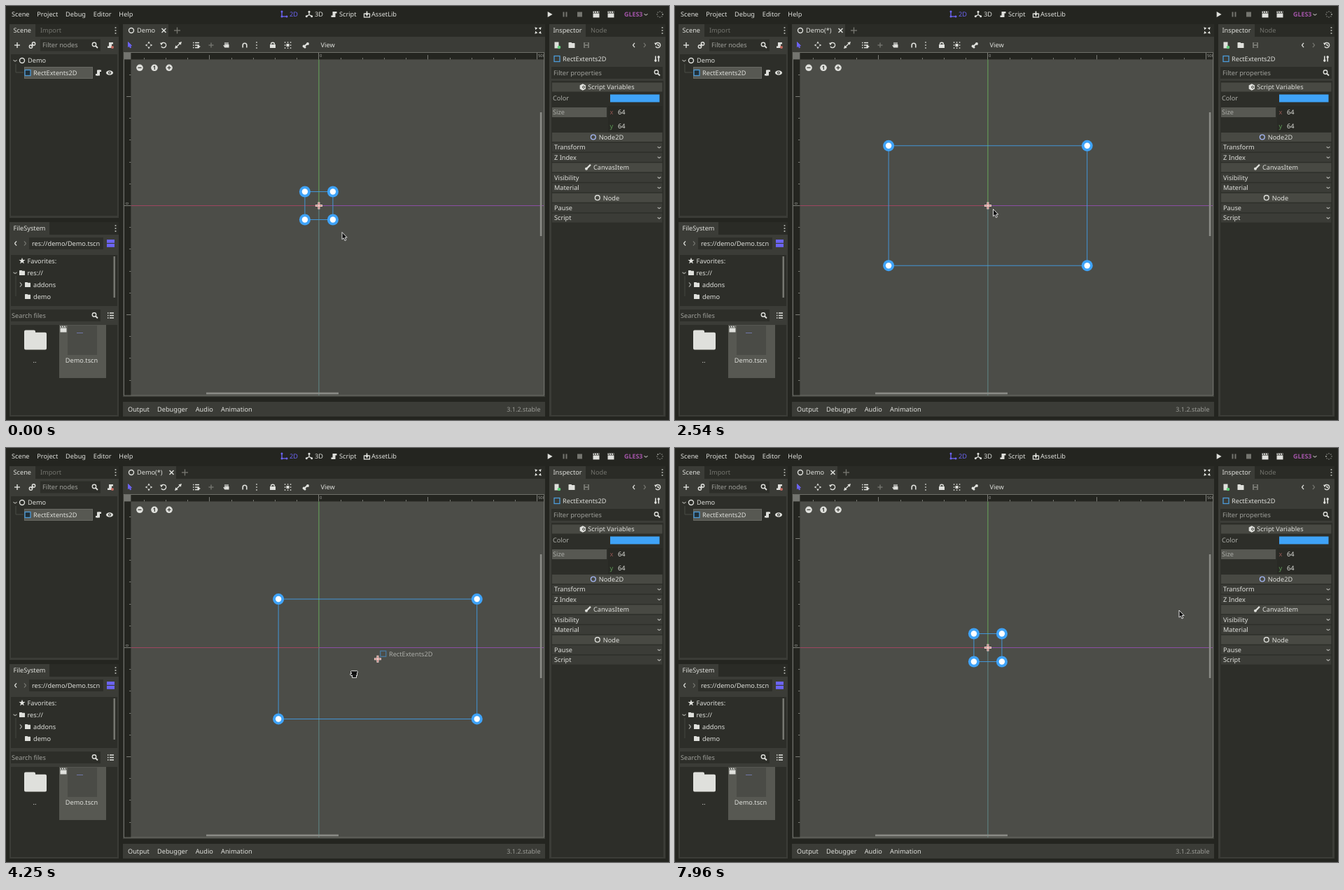
An HTML page with a canvas for the animation above (8000 ms loop, 947 by 592 pixels).

```html
<!DOCTYPE html>
<html lang="en">
<head>
<meta charset="utf-8">
<title>Rect extents editor</title>
<style>
html, body { margin: 0; width: 100%; height: 100%; overflow: hidden; background: #242520; }
canvas { display: block; }
</style>
</head>
<body>
<canvas id="stage" width="947" height="592"></canvas>
<script>
const view = document.getElementById('stage').getContext('2d');
const backdrop = document.createElement('canvas');
backdrop.width = 947;
backdrop.height = 592;
let g = backdrop.getContext('2d');

const LOOP = 8000, SCALE = 0.624, CX = 446.9, CY = 285.5, TAU = Math.PI * 2;
const OUTER = '#242520', PANEL = '#3b3c37', DARK = '#2d2e29', CANVAS = '#4c4d48', HEAD = '#484943',
  SELECT = '#575852', FG = '#dfe0dc', SOFT = '#a0a19c', OFF = '#74756f', ACCENT = '#6c64f5', BLUE = '#3fa3f8';

// ---------- drawing helpers ----------
function box(x, y, w, h, color) { g.fillStyle = color; g.fillRect(x, y, w, h); }
function frame(x, y, w, h, color, width = 1) {
  g.strokeStyle = color; g.lineWidth = width; g.strokeRect(x, y, w, h);
}
function dot(x, y, r, color = FG) {
  g.fillStyle = color; g.beginPath(); g.arc(x, y, r, 0, TAU); g.fill();
}
function ring(x, y, r, color = FG, width = 1.4, from = 0, to = TAU) {
  g.strokeStyle = color; g.lineWidth = width; g.beginPath(); g.arc(x, y, r, from, to); g.stroke();
}
function line(x1, y1, x2, y2, color = FG, width = 1.3) {
  g.strokeStyle = color; g.lineWidth = width;
  g.beginPath(); g.moveTo(x1, y1); g.lineTo(x2, y2); g.stroke();
}
function poly(x, y, points, color = FG) {
  g.beginPath();
  points.forEach(([dx, dy]) => g.lineTo(x + dx, y + dy));
  g.closePath(); g.fillStyle = color; g.fill();
}
// A regular polygon, or a star when the inner radius differs.
function star(x, y, n, r, inner, color = FG, turn = 0) {
  poly(x, y, Array.from({ length: 2 * n }, (_, i) => {
    const a = i * Math.PI / n + turn, d = i % 2 ? inner : r;
    return [Math.sin(a) * d, -Math.cos(a) * d];
  }), color);
}
const triangle = (x, y, r, turn, color) => star(x, y, 3, r, r / 2, color, turn);
function text(s, x, y, color = FG, size = 9.2, align = 'left', weight = 400) {
  g.font = `${weight} ${size}px "Noto Sans", sans-serif`;
  g.textRendering = 'geometricPrecision';
  g.textAlign = align;
  g.fillStyle = color;
  g.fillText(s, x, y + size * 0.36);
  return g.measureText(s).width;
}
function flow(labels, x, y, gap) { for (const s of labels) x += text(s, x, y) + gap; }

// ---------- icons, placed by their centre ----------
function plus(x, y, color = FG, r = 4, width = 1.4) {
  line(x - r, y, x + r, y, color, width); line(x, y - r, x, y + r, color, width);
}
function times(x, y) { line(x - 3, y - 3, x + 3, y + 3, FG, 1.5); line(x - 3, y + 3, x + 3, y - 3, FG, 1.5); }
// dir: 0 right, 1 down, 2 left
function chevron(x, y, dir, color = FG, r = 3.2) {
  g.save(); g.translate(x, y); g.rotate(dir * Math.PI / 2);
  line(-r / 3, -r, r / 2, 0, color, 1.2); line(r / 2, 0, -r / 3, r, color, 1.2);
  g.restore();
}
function menuDots(x, y) { for (let d = -4; d <= 4; d += 4) dot(x, y + d, 1.1, '#b0b1ac'); }
function rectIcon(x, y, color = '#4c9ad8') { frame(x - 4, y - 4, 8, 8, color, 1.3); }
function magnifier(x, y) { ring(x - 1, y - 1, 2.7); line(x + 1, y + 1, x + 4, y + 4, FG, 1.8); }
function folder(x, y, w = 8) {
  const h = w * 0.44, r = w / 16;
  g.fillStyle = FG; g.beginPath();
  g.roundRect(x - w / 2, y - h, w / 2, h, r);
  g.roundRect(x - w / 2, y - h * 0.76, w, h * 1.76, r);
  g.fill();
}
function script(x, y) {
  box(x - 2, y - 4, 4, 8, FG); box(x - 4, y + 1.5, 4, 2.5, FG); box(x, y - 4, 4, 2.5, FG);
}
function clapper(x, y) {
  box(x - 4.5, y - 1.5, 9, 6, FG); box(x - 4.5, y - 4.5, 9, 2.4, FG);
  for (let d = -2.5; d < 4; d += 3) line(x + d - .5, y - 4.7, x + d + .5, y - 2, OUTER, 1);
}
function tripod(x, y, color, arms) {
  for (let i = 0; i < arms; i++) {
    const a = Math.PI / 2 * 3 + i * TAU / arms, dx = Math.cos(a) * 4.3, dy = Math.sin(a) * 4.3;
    line(x, y, x + dx, y + dy, color); dot(x + dx, y + dy, 1.5, color);
  }
}
function axes2D(x, y) {
  line(x - 3, y - 4, x - 3, y + 3, ACCENT); line(x - 3, y + 3, x + 5, y + 3, ACCENT);
  dot(x - 3, y - 4, 1.5, ACCENT); dot(x - 3, y + 3, 1.5, ACCENT); dot(x + 4, y + 3, 1.5, ACCENT);
}
function download(x, y) {
  frame(x - 4, y - 1, 8, 5, FG, 1.3); line(x, y - 4.5, x, y, FG, 1.6); triangle(x, y, 2.8, Math.PI, FG);
}
function moveIcon(x, y) {
  for (let i = 0; i < 4; i++) {
    const a = i * TAU / 4;
    triangle(x + Math.sin(a) * 3.4, y - Math.cos(a) * 3.4, 2, a, FG);
  }
}
function turnIcon(x, y) { ring(x, y, 3.6, FG, 1.4, -2.6, 2.6); triangle(x - 3, y - 2, 2.4, Math.PI, FG); }
function handIcon(x, y) {
  box(x - 2.5, y - 1, 6, 4.5, FG);
  for (let d = -2; d <= 2; d += 2) line(x + d, y, x + d, y - 4, FG, 1.2);
  line(x - 4, y, x - 2, y + 3, FG, 1.5);
}
function lock(x, y) { box(x - 4, y - 1, 8, 5, FG); ring(x, y - 1.2, 2.5, FG, 1.4, Math.PI, TAU); }
function magnet(x, y) {
  ring(x, y, 2.8, FG, 1.6, Math.PI, TAU);
  for (const s of [-1, 1]) line(x + s * 2.8, y, x + s * 2.8, y + 3.5, FG, 1.6);
}
function group(x, y) {
  for (let i = 0; i < 9; i++) if (i !== 4) box(x - 4.7 + i % 3 * 4, y - 4.7 + Math.floor(i / 3) * 4, 1.5, 1.5, FG);
  box(x - 2, y - 2, 4, 4, FG);
}
function list(x, y) { for (let d = -3.5; d <= 3.5; d += 3.5) { box(x - 4, y + d - .7, 1.5, 1.5, FG); box(x - 1, y + d - .7, 6, 1.5, FG); } }
function field(x, y, w, label) { box(x, y, w, 17, DARK); text(label, x + 3, y + 8.5, SOFT); magnifier(x + w - 8, y + 8.5); }

// ---------- fixed interface ----------
function dock(x, y, w, h, tabWidth, title, hidden) {
  box(x, y, w, 18, '#2a2b26');
  box(x, y, tabWidth, 18, PANEL);
  box(x, y + 18, w, h - 18, PANEL);
  text(title, x + 5.5, y + 9);
  if (hidden) text(hidden, x + tabWidth + 7, y + 9, OFF);
  menuDots(x + w - 4.5, y + 9);
}
function drawMenu() {
  flow(['Scene', 'Project', 'Debug', 'Editor', 'Help'], 8, 12, 10.8);
  axes2D(397, 12); text('2D', 405, 12, ACCENT);
  tripod(433, 12.5, FG, 3); text('3D', 441, 12);
  script(468.5, 12); text('Script', 476, 12);
  download(515.5, 12); text('AssetLib', 522, 12);
  triangle(776, 12, 4.6, TAU / 4, FG);
  box(795.5, 8.5, 2, 7, OFF); box(799.5, 8.5, 2, 7, OFF); box(816, 8.5, 7, 7, OFF);
  clapper(843, 12); clapper(864, 12);
  text('GLES3', 883, 12, '#a455a9', 8.9, 'left', 700);
  chevron(914, 12, 1, SOFT, 2.5);
}
function drawSceneDock() {
  dock(5, 26, 156, 277, 37, 'Scene', 'Import');
  plus(16, 56);
  ring(39.5, 54, 2.2); ring(35.5, 58, 2.2); line(36, 57.5, 39, 54.5);
  field(49, 47.5, 86, 'Filter nodes');
  script(149, 56); dot(152, 59, 2, '#c46a60');
  box(7, 69, 152, 231, DARK);
  chevron(13, 78, 1, SOFT, 2.5); ring(23, 78, 3.5); text('Demo', 31, 78);
  line(14, 83, 14, 95, '#4b4c47', 1); line(14, 95, 25, 95, '#4b4c47', 1);
  box(26, 87, 98, 17, SELECT); frame(26.5, 87.5, 97, 16, '#686963');
  box(27, 91.5, 8, 8, '#20303a'); rectIcon(31, 95.5); text('RectExtents2D', 39, 95.5);
  script(132, 95.5);
  g.fillStyle = FG; g.beginPath(); g.ellipse(148, 95.5, 5, 3.3, 0, 0, TAU); g.fill();
  dot(148, 95.5, 2, DARK); dot(148, 95.5, .9);
}
function drawFileDock() {
  dock(5, 309, 156, 278, 57, 'FileSystem');
  chevron(14, 339.5, 2); chevron(27, 339.5, 0, OFF);
  box(33, 331, 106, 17, DARK); text('res://demo/Demo.tscn', 37, 339.5);
  box(144, 334, 11, 4.8, ACCENT); box(144, 340, 11, 4.8, ACCENT);
  box(7, 356, 152, 73, DARK); box(153.5, 358, 2.5, 59, '#767771');
  const rowY = i => 364.5 + 17 * i;
  star(23, rowY(0), 5, 4.8, 2); text('Favorites:', 30.5, rowY(0));
  chevron(13, rowY(1), 1, SOFT, 2.5); folder(23, rowY(1)); text('res://', 30.5, rowY(1));
  line(14, 386, 14, 415, '#454640', 1);
  chevron(21, rowY(2), 0, SOFT);
  ['addons', 'demo'].forEach((s, i) => { folder(31, rowY(i + 2)); text(s, 39, rowY(i + 2)); });
  field(7, 434, 128, ''); text('Search files', 8, 442.5, SOFT); list(149, 442.5);
  box(7, 456, 152, 129, DARK);
  folder(42, 477.5, 32); text('..', 41, 507, FG, 9.2, 'center');
  box(76, 456, 67, 76, SELECT); box(88, 457, 42, 42, '#4a4b46');
  box(101, 467, 9, 1, '#6f76a8'); clapper(82, 462);
  text('Demo.tscn', 108, 507, FG, 9.2, 'center');
}
function drawCenter() {
  box(167, 26, 603, 18, '#2a2b26');
  box(167, 44, 603, 515, PANEL);
  box(167, 566, 603, 21, PANEL);
  for (let i = 0; i < 4; i++) triangle(760 + (i % 2 ? 3 : -3), 35 + (i < 2 ? -3 : 3), 2.4, [-1, 1, -3, 3][i] * TAU / 8, FG);
  drawArrow(174.5, 51.5, ACCENT, ACCENT, .7);
  moveIcon(204, 56); turnIcon(225, 56);
  line(243, 59, 249, 53); triangle(249, 53, 2.8, TAU / 8, FG); triangle(243, 59, 2.8, TAU * 5 / 8, FG);
  list(271, 56); triangle(275, 58, 3, TAU / 4, FG);
  plus(293, 56, OFF, 3.5); handIcon(315, 56);
  magnet(341, 56); menuDots(358, 56); lock(381, 56); group(402.5, 56);
  line(426, 58, 431, 53, FG, 2.2); dot(425.5, 57.5, 1.9); dot(431, 54, 1.9); dot(427, 59, 1.5);
  text('View', 449.5, 56);
  flow(['Output', 'Debugger', 'Audio', 'Animation'], 174, 576.5, 11.2);
  text('3.1.2.stable', 763.5, 576.5, '#9a9b96', 9, 'right');

  box(169, 67, 599, 490, CANVAS);
  box(178, 285, 269, 1, '#9d4560'); box(447, 285, 321, 1, '#8b4fa3');
  box(446.4, 76, 1, 209, '#69a85d'); box(446.4, 286, 1, 271, '#618a88');
}
function drawInspector() {
  dock(776, 26, 166, 561, 52, 'Inspector', 'Node');
  box(783.5, 51.5, 6, 9, FG); dot(790, 59, 2.3, '#5fd07a');
  folder(808, 56, 9);
  box(825, 52, 8, 8, OFF); box(827, 52.5, 4, 2.5, PANEL); box(827, 57, 4, 2.5, PANEL);
  chevron(897, 56, 2); chevron(912, 56, 0, OFF);
  turnIcon(931, 56); line(931, 54, 931, 56.5); line(931, 56.5, 933, 56.5);
  rectIcon(787, 75.5); text('RectExtents2D', 795, 75.5);
  for (const s of [-1, 1]) { line(930 + s * 2.2, 71.5, 930 + s * 2.2, 79.5, FG, 1.6); dot(930 + s * 2.2, 75.5 - s * 2.5, 1.7); }
  field(779, 87, 159, 'Filter properties');
  box(779, 107, 160, 478, DARK);

  const header = (s, y) => {
    box(780, y - 6.5, 157.5, 13, HEAD);
    const width = text(s, 864.5, y, FG, 9.2, 'center');
    return 864.5 + (s === 'Script Variables' ? 0.5 : 0) - width / 2 - 8;
  };
  star(header('Script Variables', 116), 116, 3, 4.8, 4.8); ring(825, 116, 1.5, HEAD, 1);
  text('Color', 781, 132, '#aaaba6'); box(863, 126.5, 70.5, 11, BLUE);
  box(780, 145, 78, 14, SELECT); text('Size', 781, 152, '#aaaba6');
  box(860, 143, 77.5, 37, '#292a25');
  text('x', 862.5, 152, '#8d5550'); text('64', 874, 152);
  text('y', 862.5, 171.5, '#5c9a55'); text('64', 874, 171.5);

  const rows = ['# Node2D', 'Transform', 'Z Index', '# CanvasItem', 'Visibility', 'Material', '# Node', 'Pause', 'Script'];
  rows.forEach((row, i) => {
    const y = 187.5 + 14.45 * i;
    if (row[0] !== '#') {
      box(780, y - 6.5, 157.5, 13, PANEL); text(row, 783, y); chevron(933, y, 1, '#b0b1ac', 2.3);
      return;
    }
    const x = header(row.slice(2), y);
    if (row === '# CanvasItem') { line(x - 2, y + 2, x + 4, y - 4, FG, 2.2); dot(x - 2, y + 2, 2); }
    else ring(x, y, 3.4, row === '# Node2D' ? '#a5b7f3' : FG);
  });
}

// ---------- motion ----------
const SPANS = {
  approach: [210, 420], widen: [630, 1380], heighten: [1460, 1920], release: [2130, 2540],
  lift: [2710, 3500], orbit: [3580, 4400], settle: [4420, 4560], leave: [4660, 5170], exit: [7830, 7960],
};
const UNDO_MOVE = 5710, UNDO_SIZE = 6380, DROP = 4660;

function progress(name, t) {
  const [from, to] = SPANS[name];
  return Math.min(1, Math.max(0, (t - from) / (to - from)));
}
const smooth = u => u * u * (3 - 2 * u);
const mix = (a, b, u) => a + (b - a) * u;
const glide = (a, b, u) => [mix(a[0], b[0], u), mix(a[1], b[1], u)];

// Half width and half height of the handles.
function halfSize(t) {
  if (t >= SPANS.exit[0]) return [20, 20];
  const u = progress('widen', t), v = smooth(progress('heighten', t));
  const w = mix(20, 150.7, Math.sin(u * Math.PI / 2)), h = mix(20, 18, u) + 32 * Math.sin(u * Math.PI);
  return glide([w, h], [141.8, 85.7], v);
}
// The node is lifted away, swung clockwise round an ellipse, then set down.
function nodeCentre(t) {
  if (t >= UNDO_MOVE) return [CX, CY];
  const lift = progress('lift', t);
  let shift = [90 * smooth(lift), 3.5 * lift - 50 * Math.sin(lift * Math.PI)];
  if (t >= SPANS.orbit[0]) {
    const a = 0.27 + 8.06 * progress('orbit', t);
    shift = [42 + 50 * Math.cos(a), -8.3 + 45.3 * Math.sin(a)];
  }
  shift = glide(shift, [21.1, 7.2], smooth(progress('settle', t)));
  return [CX + shift[0], CY + shift[1]];
}
function arrowTip(t) {
  if (t < SPANS.widen[0]) return glide([480, 323.5], [474, 317], progress('approach', t));
  if (t < SPANS.release[1]) {
    const [w, h] = halfSize(t);
    return glide([CX + w, CY + h - 1.5], [454.5, 290.5], progress('release', t));
  }
  if (t < DROP) return [454.5, 290.5];
  const rest = glide([470, 294], [514.8, 404], smooth(progress('leave', t)));
  return glide(rest, [720, 232], progress('exit', t));
}

// ---------- moving parts ----------
function drawTab(dirty) {
  const w = dirty ? 76 : 65;
  box(167, 26, w, 18, PANEL);
  ring(179, 35, 3.5);
  text(dirty ? 'Demo(*)' : 'Demo', 187, 35);
  times(160.5 + w, 35);
  plus(179.5 + w, 35, OFF, 4.5);
}
function drawRulers(fine) {
  const unit = fine ? 8 : 50, step = unit * SCALE, width = 9.4, mark = '#7c7d77';
  g.save();
  g.beginPath(); g.rect(169, 67, 599, 490); g.clip();
  box(169, 67, 599, width, OUTER); box(169, 67, width, 490, OUTER);
  for (let k = -60; k <= 70; k++) {
    const x = Math.round(CX - .5 + k * step), y = Math.round(CY - .5 + k * step);
    const length = width * (k % 10 === 0 ? 1 : k % 5 === 0 ? 0.67 : 0.25);
    if (x > 178) box(x, 67 + width - length, 1, length, mark);
    if (y > 76) box(169 + width - length, y, length, 1, mark);
    if (k % 10) continue;
    if (x > 178) text(k * unit, x + 2, 71, SOFT, 5.8);
    if (y > 76) {
      g.save(); g.translate(172.5, y - 1); g.rotate(-Math.PI / 2);
      text(k * unit, 0, 0, SOFT, 5.8); g.restore();
    }
  }
  box(169, 67, width, width, '#747570');
  g.restore();
  frame(168.5, 66.5, 600, 490.5, mark, .8);
}
function drawOverlay() {
  for (let i = 0; i < 3; i++) dot(191 + 21 * i, 88.3, 4.8);
  line(188.5, 88.3, 193.5, 88.3, CANVAS, 1.4);
  text('1', 211.8, 88.3, '#30312c', 7.5, 'center', 700);
  plus(233, 88.3, CANVAS, 2.5);
  box(762.8, 152, 2.6, 177, '#8a8b86'); box(286, 552.6, 189, 2.6, '#8a8b86');
}
function drawArrow(x, y, fill = '#0c0c0c', edge = '#f2f2f2', k = 1) {
  const outline = [[0, 0], [0, 10.2], [2.3, 8.2], [4, 12], [5.8, 11.2], [4.2, 7.5], [7.2, 7.5]];
  poly(x, y, outline.map(([dx, dy]) => [dx * k, dy * k]), fill);
  g.lineWidth = .9; g.strokeStyle = edge; g.stroke();
}
function drawGrab(x, y) {
  for (const [grow, color] of [[.9, '#f2f2f2'], [0, '#0c0c0c']]) {
    for (let i = 0; i < 4; i++) dot(x - 2.8 + i * 2.1, y - 2.6, 1.2 + grow, color);
    dot(x - 3.8, y + .8, 1 + grow, color);
    box(x - 3 - grow, y - 2, 7 + grow * 2, 4 + grow, color);
    box(x - 2 - grow, y + 2, 5 + grow * 2, 3 + grow, color);
  }
}
function drawSpinner(t) {
  const done = Object.keys(SPANS).reduce((sum, name) => sum + progress(name, t), 0);
  const turn = Math.floor(done * 12);
  for (let i = 0; i < 8; i++) {
    const a = i * TAU / 8;
    dot(934 + Math.cos(a) * 4, 12 + Math.sin(a) * 4, .9, (turn - i) % 8 ? '#6d6e69' : '#b5b6b1');
  }
}
function drawNode(t, dragging) {
  const [x, y] = nodeCentre(t), [w, h] = halfSize(t);
  const [rw, rh] = t < UNDO_SIZE ? [w, h] : [20, 20];
  frame(x - rw, y - rh, rw * 2, rh * 2, '#429de6', .9);
  for (let i = 0; i < 4; i++) {
    const hx = x + (i % 2 ? w : -w), hy = y + (i < 2 ? -h : h);
    dot(hx, hy, 8, BLUE); dot(hx, hy, 4.2, '#fff');
  }
  plus(x, y, '#f1dcd9', 5, 3); plus(x, y, '#c77672', 4.3, 1.3); dot(x, y, 1.2, '#efd5d2');
  if (dragging) {
    rectIcon(x + 7.8, y - 7.5, '#49799e');
    text('RectExtents2D', x + 16, y - 7.5, 'rgba(223,224,220,.65)');
  }
}
function drawPointer(t, dragging) {
  if (!dragging) return drawArrow(...arrowTip(t));
  // The hand runs ahead of the node, which redraws late.
  const [x, y] = nodeCentre(t + 87);
  drawGrab(x + 1, y + .8);
}

function render(now) {
  const t = now % LOOP, dragging = t >= SPANS.lift[0] && t < DROP;
  const snapping = (t >= 5290 && t < 6790) || (t >= 7420 && t < SPANS.exit[0]);
  g = view;
  g.drawImage(backdrop, 0, 0);
  drawTab(t >= SPANS.heighten[1] && t < UNDO_SIZE);
  drawSpinner(t);
  drawNode(t, dragging);
  drawRulers(snapping);
  drawOverlay();
  drawPointer(t, dragging);
}

box(0, 0, 947, 592, OUTER);
drawMenu(); drawSceneDock(); drawFileDock(); drawCenter(); drawInspector();

let start;
function tick(now) {
  start ??= now;
  render(now - start);
  requestAnimationFrame(tick);
}
render(0);
requestAnimationFrame(tick);
</script>
</body>
</html>
```
